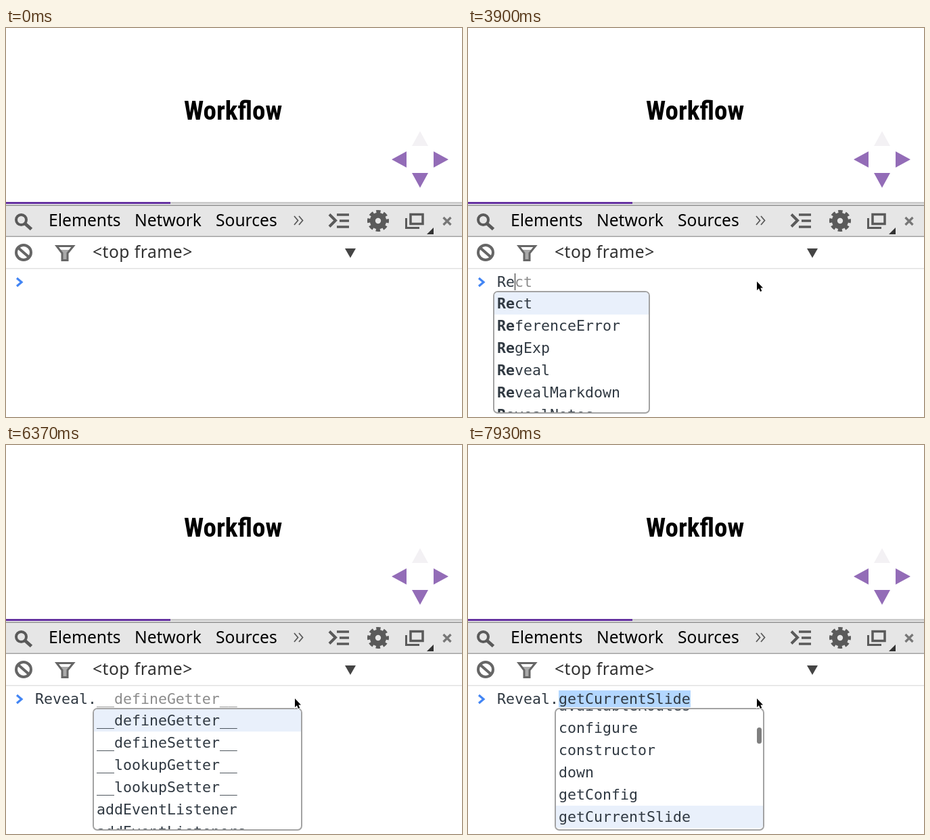
Animation of 674x577 px, one loop 8000 ms. Source, as an HTML page:

```html
<!DOCTYPE html>
<html lang="en">
<head>
<meta charset="utf-8">
<title>Console completion</title>
<style>
  html, body { margin: 0; width: 100%; height: 100%; overflow: hidden; background: #fff; }
  svg, #line, #caret, #popup, #thumb { position: absolute; }
  svg { left: 0; top: 0; }
  .title { font: bold 39px 'Roboto Condensed', Roboto, sans-serif; font-stretch: condensed; text-anchor: middle; }
  .tab { font: 24.6px 'Noto Sans', 'Open Sans', sans-serif; }
  .icon { fill: none; stroke: #5a5a5a; stroke-width: 4; }
  #line, #popup { font: 21.59px/33px 'DejaVu Sans Mono', monospace; color: #303942; white-space: pre; }
  #line { left: 43px; top: 360px; }
  #line i { font-style: normal; color: #8c8c8c; }
  #line mark { color: inherit; background: #b3d7ff; }
  #caret { top: 364px; width: 1px; height: 25px; background: #222; }
  #popup { top: 390px; box-sizing: border-box; overflow: hidden; background: #fff;
    border: 2px solid #a3a3a3; border-radius: 7px; }
  #rows div { height: 33px; padding-left: 4px; }
  #rows .on { background: #e9f0fb; }
  #thumb { left: 297px; width: 7px; height: 24px; border-radius: 4px; background: #7f7f7f; }
</style>
</head>
<body>
<svg width="674" height="577">
  <text class="title" x="335.5" y="135.5">Workflow</text>
  <g fill="#936cb7">
    <path d="M570 195l22-12v24zM654 195l-22-12v24zM612 237l-12-22h24z"/>
    <path d="M612 153l-12 22h24z" fill="#f3f1f4"/>
  </g>
  <path d="M0 258h674v3H0z" fill="#cbcbcb"/>
  <path d="M0 258h243v3H0z" fill="#6431a0"/>
  <path d="M0 262h674v48H0z" fill="#a3a3a3"/>
  <path d="M0 264h674v44.5H0z" fill="#e6e6e6"/>
  <path d="M0 356h674v1.5H0z" fill="#e1e1e1"/>
  <g class="tab">
    <text x="63" y="294">Elements</text>
    <text x="190" y="294">Network</text>
    <text x="310" y="294">Sources</text>
    <text x="128" y="341" fill="#303030" letter-spacing=".5">&lt;top frame&gt;</text>
  </g>
  <g class="icon">
    <circle cx="22.5" cy="284.5" r="7.5"/>
    <path d="M28 290l9.5 8.5" stroke-width="5"/>
    <path d="M426 279l5.5 6.5-5.5 6.5M433 279l5.5 6.5-5.5 6.5" stroke-width="1.8"/>
    <path d="M478 276.5l9 9-9 9"/>
    <path d="M489 277h18M493 286h14M489 295h18" stroke-width="3.5"/>
    <circle cx="550" cy="286" r="8.2" stroke-width="8"/>
    <circle cx="550" cy="286" r="13" stroke-width="6" stroke-dasharray="6 4.21" stroke-dashoffset="3"/>
    <path d="M598 276.500h18v14h-18z" stroke-width="3.5"/>
    <path d="M591.5 282v14.500H611" stroke-width="3"/>
    <path d="M646.500 281l11 11m0-11l-11 11" stroke="#777" stroke-width="3.3"/>
    <g stroke="#666">
      <circle cx="26" cy="333" r="11"/>
      <path d="M18 326l16 14"/>
      <path d="M78 329h18l-5 6v10h-8v-10z" fill="#aaa" stroke="none"/>
      <path d="M75 323.500h24.500l-8.500 10.500v10.500h-8v-10.500z" stroke-width="3"/>
    </g>
    <path d="M16 371l7 6-7 6" stroke="#4285f4" stroke-width="3.2"/>
  </g>
  <path d="M632 296v10h-10z" fill="#333"/>
  <path d="M501 327h16l-8 14z" fill="#444"/>
</svg>
<div id="line"></div>
<div id="caret"></div>
<div id="popup"><div id="rows"></div><div id="thumb"></div></div>
<svg width="674" height="577">
  <path id="mouse" d="M0 0v13l3-2.700 2 4.700 2.300-1-2-4.500H9z" stroke="#fff" stroke-width="2" paint-order="stroke"/>
</svg>
<script>
const LOOP = 8000, CHAR = 13, ROW = 33;
const $ = id => document.getElementById(id);

const globals = ['Rect', 'ReferenceError', 'RegExp', 'Reveal', 'RevealMarkdown', 'RevealNotes'];
const members = ['__defineGetter__', '__defineSetter__', '__lookupGetter__', '__lookupSetter__',
  'addEventListener', 'addEventListeners', 'availableFragments', 'availableRoutes', 'configure',
  'constructor', 'down', 'getConfig', 'getCurrentSlide', 'getIndices'];

// [time, typed text, caret shown, prefix being completed, chosen member]
const typing = [
  [0, '', false],
  [2730, '', true],
  [3250, '', false],
  [3640, 'R', true],
  [3900, 'Re', true, 'Re'],
  [4290, 'Rev', true, 'Rev'],
  [4420, 'Reve', true, 'Reve'],
  [4940, 'Reveal', true],
  [5460, 'Reveal', false],
  [5590, 'Reveal.', true],
  [5850, 'Reveal.', true, '', 0],
  [6370, 'Reveal.', false, '', 0],
  [6630, 'Reveal.', false, '', 1],
  ...[3, 4, 6, 8, 9, 11, 12].map((pick, i) => [7150 + 130 * i, 'Reveal.', false, '', pick])
];

// [time, x, y]
const pointer = [[0, -50, -50], [260, 466, 310], [390, 432, 345], [520, 406, 370],
  [1040, 416, 377], [1170, 425, 376], [1560, 427, 376]];

const at = (keys, t) => keys.findLast(key => key[0] <= t);

function showPopup(prefix, pick) {
  const open = prefix !== undefined;
  $('popup').hidden = !open;
  if (!open) return;
  const list = prefix ? globals.filter(name => name.startsWith(prefix)) : members;
  const scroll = Math.max(0, (pick - 4) * ROW - 11);
  const box = $('popup').style;
  box.left = (prefix ? 37 : 128) + 'px';
  box.width = (prefix ? 232 : 310) + 'px';
  box.height = Math.min(182, list.length * ROW + 4) + 'px';
  $('rows').innerHTML = list.map((name, i) =>
    `<div class="${i === pick ? 'on' : ''}"><b>${prefix}</b>${name.slice(prefix.length)}</div>`).join('');
  $('rows').style.marginTop = -scroll + 'px';
  $('thumb').hidden = !scroll;
  $('thumb').style.top = 1.6 + scroll * .0985 + 'px';
  const rest = list[pick].slice(prefix.length);
  $('line').innerHTML += pick ? `<mark>${rest}</mark>` : `<i>${rest}</i>`;
}

let shown;
function draw(now) {
  const t = now % LOOP;
  const state = at(typing, t);
  if (state !== shown) {
    shown = state;
    const [, text, caret, prefix, pick = 0] = state;
    $('line').textContent = text;
    $('caret').hidden = !caret;
    $('caret').style.left = 43 + CHAR * text.length + 'px';
    showPopup(prefix, pick);
  }
  const [, x, y] = at(pointer, t);
  $('mouse').setAttribute('transform', `translate(${x} ${y})`);
}

const start = performance.now();
(function tick() {
  draw(performance.now() - start);
  requestAnimationFrame(tick);
})();
</script>
</body>
</html>
```
